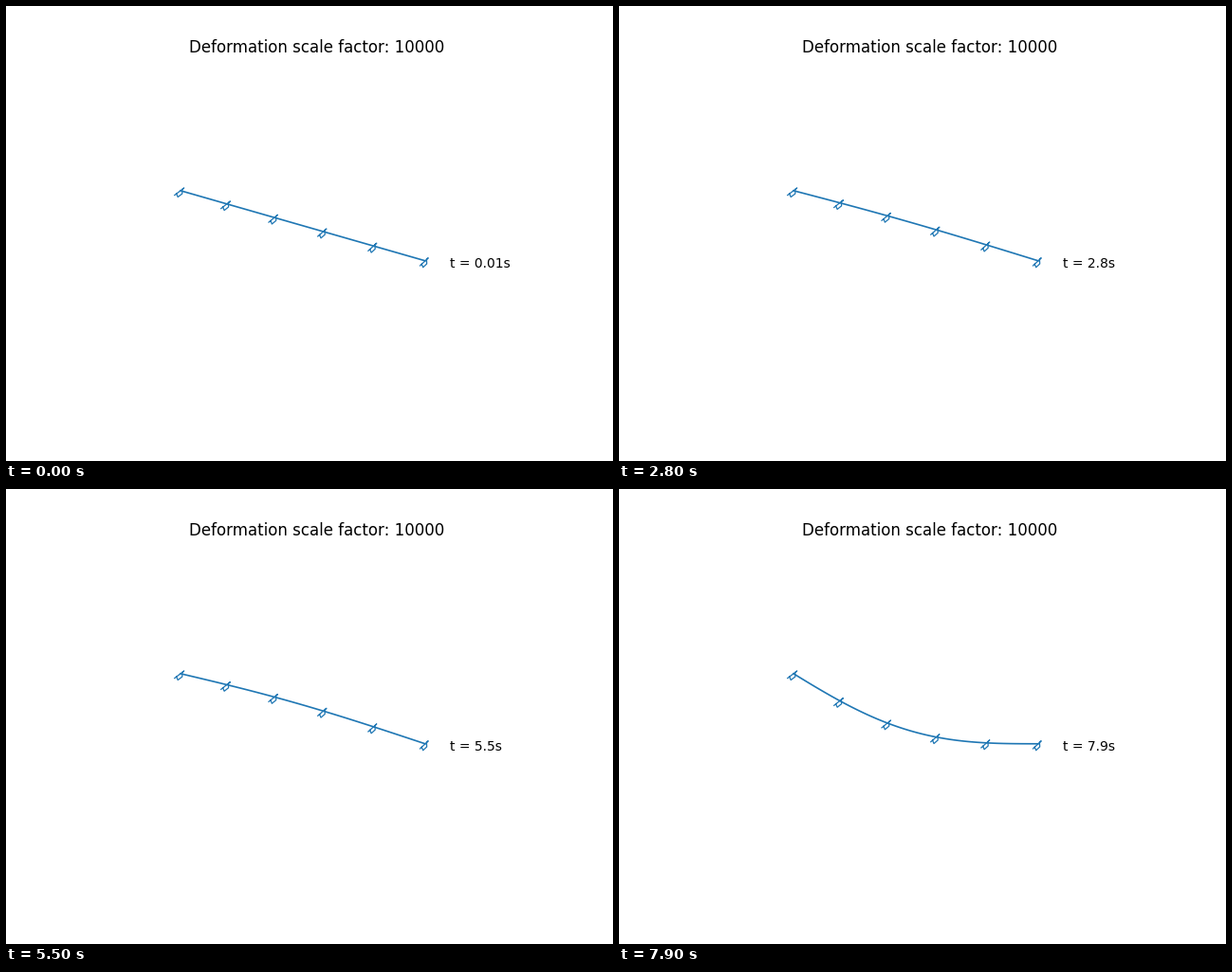
Animation of 640 by 480 pixels, one loop 8000 ms. Source, as a matplotlib script:

```python
import numpy as np
import matplotlib.pyplot as plt
from matplotlib.animation import FuncAnimation

W, H, DPI = 640, 480, 100
FRAMES, STEP = 80, 100
BLUE = "#1f77b4"
FONT = "DejaVu Sans"

START, END = np.array([184.0, 194.8]), np.array([442.0, 268.8])
DEPTH = 0.071     # perspective foreshortening along the beam
GROWTH = 3.2      # resonant amplitude gain, px per second
FREQ = 0.538      # Hz

# Girder section: the deck runs over 0..1 across, the box hangs one unit below
INSET, TAPER = 0.2, 0.07
DROP = np.array([0.8, 4.0])


def sway(t):
    wobble = 0.031 * np.sin(2 * np.pi * (t - 3.5) / 3.8)
    return GROWTH * t * np.sin(2 * np.pi * (FREQ * t - wobble))


def beam(s, t):
    """Screen points at positions s (0..1) along the beam."""
    frac = s / (1 + DEPTH * (1 - s))
    pts = START + np.outer(frac, END - START)
    pts[:, 1] += sway(t) * np.sin(np.pi * s)
    return pts


def girder(s):
    """Section outline around a beam point; its width turns with depth."""
    across = np.array([10 - 1.4 * s, -7.6 - 0.6 * s])
    a, b = INSET, INSET + TAPER
    u = np.array([0, 1, 1 - a, 1 - b, b, a])
    v = np.array([0, 0, 0, 1, 1, 0])
    return np.outer(u - 0.63, across) + np.outer(v, DROP)


fig = plt.figure(figsize=(W / DPI, H / DPI), dpi=DPI, facecolor="white")
ax = fig.add_axes([0, 0, 1, 1])
ax.set_xlim(0, W)
ax.set_ylim(H, 0)
ax.axis("off")

ax.text(328, 49.3, "Deformation scale factor: 10000", fontsize=12,
        ha="center", family=FONT)
label = ax.text(467.5, 276, "", fontsize=10, family=FONT)

span = np.linspace(0, 1, 101)
nodes = np.linspace(0, 1, 6)
curve, = ax.plot([], [], color=BLUE, lw=1.2)
sections = [ax.plot([], [], color=BLUE, lw=0.9)[0] for _ in nodes]


def update(i):
    t = i * STEP / 1000
    curve.set_data(*beam(span, t).T)
    for s, point, line in zip(nodes, beam(nodes, t), sections):
        line.set_data(*(point + girder(s)).T)
    label.set_text(f"t = {t:.1f}s" if i else "t = 0.01s")
    return [curve, label, *sections]


anim = FuncAnimation(fig, update, frames=FRAMES, interval=STEP,
                     repeat=True, repeat_delay=0)
plt.show()
```
